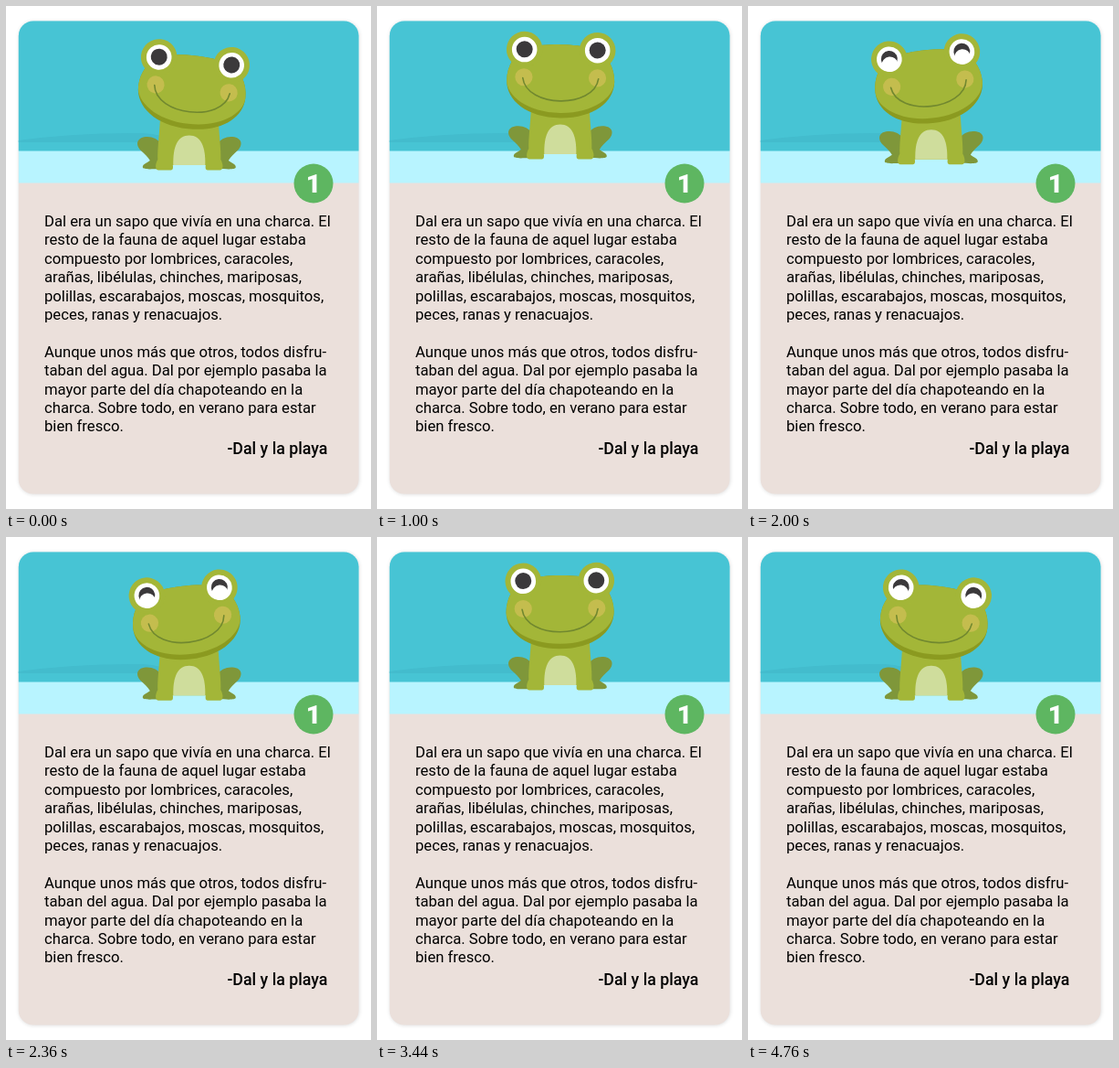
Animation, 400 px wide and 550 px high, one loop 4800 ms. Source, as an HTML page with a canvas:

```html
<!DOCTYPE html>
<html lang="es">
<head>
<meta charset="utf-8">
<title>Sapo</title>
<style>
html, body { margin: 0; width: 100%; height: 100%; overflow: hidden; background: #fff; }
canvas { display: block; }
</style>
</head>
<body>
<canvas id="stage" width="400" height="550"></canvas>
<script>
const ctx = document.getElementById('stage').getContext('2d');
const LOOP = 4800, HOP = 2400, STEP = 40;
const AXIS = 200.8, NECK = 120;
const GREEN = '#a3b638', RIM = '#8b9a20', LEG = '#7f973a', BELLY = '#cfdd9c',
      CHEEK = '#c4bd4e', SMILE = '#71882f', PUPIL = '#3b393b';

const lines = [
  'Dal era un sapo que vivía en una charca. El',
  'resto de la fauna de aquel lugar estaba',
  'compuesto por lombrices, caracoles,',
  'arañas, libélulas, chinches, mariposas,',
  'polillas, escarabajos, moscas, mosquitos,',
  'peces, ranas y renacuajos.',
  '',
  'Aunque unos más que otros, todos disfru-',
  'taban del agua. Dal por ejemplo pasaba la',
  'mayor parte del día chapoteando en la',
  'charca. Sobre todo, en verano para estar',
  'bien fresco.'
];

function fill(color, path) {
  ctx.fillStyle = color;
  ctx.fill(new Path2D(path));
}

function ellipse(color, x, y, rx, ry = rx) {
  ctx.fillStyle = color;
  ctx.beginPath();
  ctx.ellipse(x, y, rx, ry, 0, 0, Math.PI * 2);
  ctx.fill();
}

function mirrored(draw) {
  for (const side of [1, -1]) {
    ctx.save();
    ctx.scale(side, 1);
    draw();
    ctx.restore();
  }
}

function card() {
  ctx.fillStyle = '#fff';
  ctx.fillRect(0, 0, 400, 550);
  ctx.save();
  ctx.beginPath();
  ctx.roundRect(13.8, 16.5, 372.7, 517, 16);
  ctx.shadowColor = 'rgba(0,0,0,.14)';
  ctx.shadowBlur = 4;
  ctx.shadowOffsetX = ctx.shadowOffsetY = 0.5;
  ctx.fillStyle = '#ebe0db';
  ctx.fill();
  ctx.shadowColor = 'transparent';
  ctx.clip();
  ctx.fillStyle = '#b8f4ff';
  ctx.fillRect(0, 0, 400, 193.5);
  ctx.fillStyle = '#47c4d4';
  ctx.fillRect(0, 0, 400, 158.5);
  fill('#43bccd', 'M13 147 Q80 138 150 139 Q172 140 185 149 L13 149Z');
  ctx.restore();
}

function copy() {
  ctx.textAlign = 'left';
  ctx.fillStyle = '#000';
  ctx.font = '400 16.67px Roboto, sans-serif';
  lines.forEach((line, i) => ctx.fillText(line, 42, 241 + i * 20.4));
  ctx.font = '500 17.8px Roboto, sans-serif';
  ctx.fillText('-Dal y la playa', 242.5, 489.5);

  ellipse('#5eb661', 337, 194, 21.5);
  ctx.fillStyle = '#fff';
  ctx.font = '900 28.5px Roboto, sans-serif';
  ctx.textAlign = 'center';
  ctx.fillText('1', 337, 204);
}

function body() {
  mirrored(() => {
    fill(LEG, 'M-31 31 C-35 24 -45 21 -53 24.5 C-59 28 -57 34 -53 38 C-49 42 -45 45 -43 49 C-47 52 -51 53 -51 56 C-51 59 -44 58.5 -32 58Z');
  });
  fill(GREEN, 'M-32 6 C-33 23 -35 38 -34.5 48 C-37 52 -38 59 -34 59.5 L-20 59.5 Q-17 59 -18 54 L18 54 Q17 59 20 59.5 L34 59.5 C38 59 37 52 34.5 48 C35 38 33 23 32 6Z');
  fill(BELLY, 'M-17.5 54 C-18 34 -13 21.5 0 21.5 C13 21.5 18 34 17.5 54Z');
}

function eye(happy) {
  ellipse(GREEN, 40, -60, 19.8);
  ellipse('#fff', 40, -60, 13.8);
  ellipse(PUPIL, 40, -60.3, 9);
  if (happy) ellipse('#fff', 40, -54.5, 8.8, 8.2);
}

function headShape(color, chin) {
  const low = chin - 18;
  fill(color, `M0 -66 C25 -66 46 -62 53 -48 C57 -41 59 -34 59 -26 C59 ${low} 36 ${chin} 0 ${chin}
    C-36 ${chin} -59 ${low} -59 -26 C-59 -34 -57 -41 -53 -48 C-46 -62 -25 -66 0 -66Z`);
}

function head(happy) {
  headShape(RIM, 14.3);
  headShape(GREEN, 8.8);
  mirrored(() => {
    eye(happy);
    ellipse(CHEEK, 40.3, -29.8, 9.6);
  });
  ctx.strokeStyle = SMILE;
  ctx.lineWidth = 1.6;
  ctx.lineCap = 'round';
  ctx.stroke(new Path2D('M-41.5 -29 C-37 4 37 4 41.5 -29'));
}

function frog(time) {
  const lift = 12.3 * Math.abs(Math.sin(Math.PI * time / HOP));
  const tilt = 6.4 * Math.cos(2 * Math.PI * (time + 100) / LOOP);
  ctx.save();
  ctx.translate(AXIS, NECK - lift);
  body();
  ctx.rotate(tilt * Math.PI / 180);
  head(time % HOP >= HOP / 2);
  ctx.restore();
}

const start = performance.now();

function draw() {
  const elapsed = (performance.now() - start) % LOOP;
  card();
  frog(Math.floor(elapsed / STEP) * STEP);
  copy();
  requestAnimationFrame(draw);
}
draw();
</script>
</body>
</html>
```
